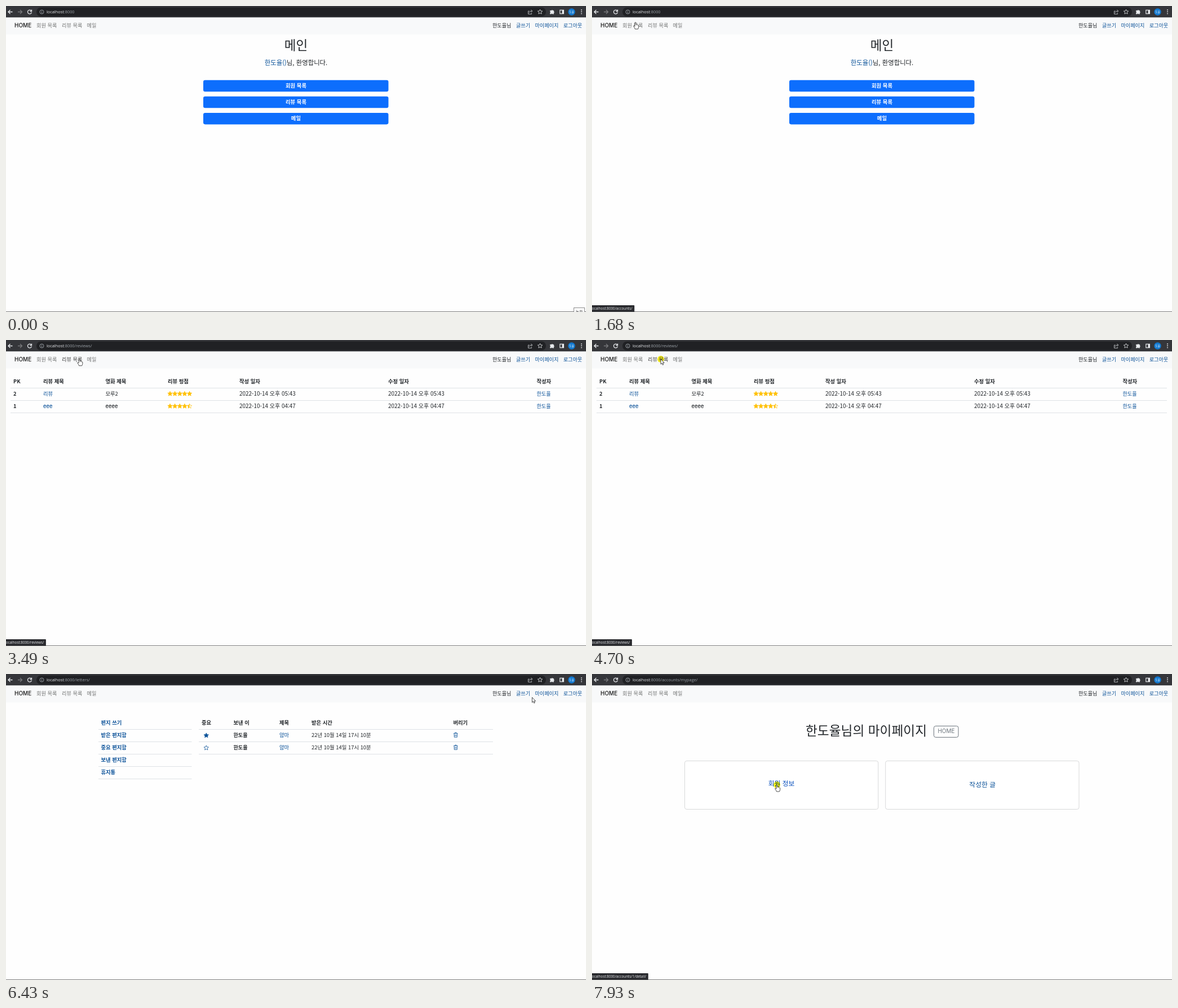
An HTML page that plays this animation: 1029 px wide and 544 px high, repeating every 8 s.

```html
<!DOCTYPE html>
<html lang="ko">
<head>
<meta charset="utf-8">
<style>
  html, body { margin: 0; width: 100%; height: 100%; overflow: hidden; background: #fefefe; }
  svg { display: block; }
  text { font-family: "Noto Sans CJK KR", "Noto Sans CJK", "Noto Sans", sans-serif; white-space: pre; }
  .latin { font-family: Inter, sans-serif; }
  .chrome { font-family: "Open Sans", sans-serif; }
  #glow { mix-blend-mode: multiply; }
</style>
</head>
<body>
<svg id="stage" width="1029" height="544" viewBox="0 0 1029 544"></svg>
<script>
const INK = '#212529', LINK = '#0b5299', MUTED = '#747575', LINE = '#dee2e6', BLUE = '#0d6efd';
const USER = '한도율';

// x, vertical centre, content, then options
function text(x, cy, content, { size = 9.3, fill = INK, weight = 500, anchor = 'start', cls = '', id = '' } = {}) {
  return `<text id="${id}" class="${cls}" x="${x}" y="${cy + size * 0.37}" font-size="${size}" fill="${fill}"
    font-weight="${weight}" text-anchor="${anchor}">${content}</text>`;
}
const rule = (x1, x2, y) => `<path d="M${x1} ${y}H${x2}" stroke="${LINE}"/>`;
const icon = (x, y, d, stroke, width = 1.2, fill = 'none') =>
  `<path transform="translate(${x} ${y})" d="${d}" stroke="${stroke}" stroke-width="${width}" fill="${fill}"/>`;
const heads = (cy, columns) => columns.map(([x, s]) => text(x, cy, s, { weight: 700 })).join('');

function starPath(r) {
  const points = Array.from({ length: 10 }, (_, i) => {
    const radius = i % 2 ? r * 0.47 : r, a = i * Math.PI / 5 - Math.PI / 2;
    return `${(radius * Math.cos(a)).toFixed(2)} ${(radius * Math.sin(a)).toFixed(2)}`;
  });
  return `M${points.join('L')}Z`;
}
const STAR = starPath(4.4);

function rating(cy, score) {
  let out = '';
  for (let i = 0; i < 5; i++) {
    const x = 291 + i * 8.65, full = i + 1 <= score;
    out += icon(x, cy, STAR, '#ffc107', 0.7, full ? '#ffc107' : 'none');
    if (!full) out += icon(x, cy, 'M0 -4.4L-1.2 -1.7L-4.2 -1.4L-2 .6L-2.6 3.6L0 2Z', 'none', 0, '#ffc107');
  }
  return out;
}

function toolbar() {
  const light = '#e8eaed', gray = '#9aa0a6';
  return `<rect width="1029" height="20.5" fill="#35363a"/>
    <rect x="54" y="2.5" width="904" height="16" rx="8" fill="#202124"/>`
    + icon(7.5, 10.5, 'M4 0H-3.3M0 -3.5L-3.5 0L0 3.5', light, 1.3)
    + icon(25, 10.5, 'M-4 0H3.3M0 -3.5L3.5 0L0 3.5', '#77787b', 1.3)
    + `<g id="reload">${icon(42, 10.5, 'M2.6 -2.3A3.5 3.5 0 1 0 3.4 .8M3.5 -4V-1H.5', light, 1.3)}</g>`
    + `<g id="stop">${icon(42, 10.5, 'M-3 -3L3 3M3 -3L-3 3', light, 1.3)}</g>`
    + `<circle cx="63.5" cy="10.5" r="3.5" fill="none" stroke="${gray}"/>`
    + icon(63.5, 10.5, 'M0 -2V-1M0 -.3V2', gray, 1)
    + `<text id="url" class="chrome" x="72" y="13.2" font-size="7.35" fill="#e8eaed">localhost<tspan
        fill="${gray}">:8000</tspan><tspan id="path" fill="${gray}"></tspan></text>`
    + icon(930, 11, 'M-1.5 -2H-3.5V3.3H2.5V1.5M-1.8 1C-1.5 -1 0 -2 3.6 -2M1.5 -4.2L3.8 -2L1.5 .2', '#c4c7ca', 0.9)
    + icon(947.5, 10.5, STAR, '#d5d7da', 0.9)
    + icon(969, 10.5, 'M-3.7 -2.5H-1.2A1.3 1.3 0 0 1 1.2 -2.5H2.8V-.6A1.3 1.3 0 0 1 2.8 1.8V3.8H.6A1.2 1.2 0 0 0 -1.6 3.8H-3.7V1.6A1.2 1.2 0 0 0 -3.7 -.6Z', light, 0.3, light)
    + `<rect x="982.8" y="7.3" width="6.6" height="6.4" fill="none" stroke="${light}" stroke-width="1.2"/>
       <rect x="986.5" y="7" width="3" height="7" fill="${light}"/>
       <circle cx="1003.5" cy="10.5" r="6.2" fill="#1279d1"/>`
    + text(1003.5, 10.4, USER.slice(1), { size: 4.6, fill: '#fff', anchor: 'middle' })
    + [7, 10.3, 13.6].map(y => `<circle cx="1021" cy="${y}" r=".95" fill="${light}"/>`).join('');
}

function navbar() {
  return `<rect y="20.5" width="1029" height="30" fill="#f8f9fa"/>`
    + text(15, 34.6, 'HOME', { size: 10, fill: '#181818', cls: 'latin' })
    + text(54, 34.4, '회원 목록', { size: 9.2, fill: MUTED })
    + text(99, 34.4, '리뷰 목록', { size: 9.2, fill: MUTED, id: 'navReviews' })
    + text(143.5, 34.4, '메일', { size: 9.2, fill: MUTED, id: 'navMail' })
    + text(863, 34.4, USER + '님', { size: 9.1 })
    + [[905, '글쓰기'], [938.5, '마이페이지'], [988.7, '로그아웃']]
      .map(([x, s]) => text(x, 34.4, s, { size: 9.1, fill: LINK })).join('');
}

function mainPage() {
  const buttons = ['회원 목록', '리뷰 목록', '메일'].map((label, i) => {
    const y = 131.7 + i * 29.1;
    return `<rect x="350" y="${y}" width="328.5" height="20.5" rx="3.3" fill="${BLUE}"/>`
      + text(514.5, y + 9.5, label, { size: 9.4, fill: '#fff', weight: 700, anchor: 'middle' });
  });
  return text(514.5, 70, '메인', { size: 22.5, anchor: 'middle' })
    + text(514.5, 100.6, `<tspan fill="${LINK}">${USER}()</tspan>님, 환영합니다.`, { size: 11.4, anchor: 'middle' })
    + buttons.join('');
}

function accountsPage() {
  return heads(73.3, [[13, 'PK'], [134, '이름'], [321, '이메일']])
    + rule(8, 1020, 85.5) + rule(8, 1020, 107.5)
    + text(12.5, 95.6, '1')
    + text(134, 95.6, USER, { size: 9.1, fill: LINK })
    + text(321, 95.6, 'norabit0417@mail.test', { size: 9.8, cls: 'latin', weight: 400 });
}

function reviewsPage() {
  const columns = [[13, 'PK'], [66, '리뷰 제목'], [176.5, '영화 제목'], [287, '리뷰 평점'],
    [414, '작성 일자'], [678, '수정 일자'], [941.5, '작성자']];
  const rows = [['2', '리뷰', '모루2', 5, '05:43'], ['1', 'eee', 'eeee', 4.5, '04:47']];
  return heads(73.3, columns) + rule(8, 1020, 85.5) + rows.map(([pk, title, film, score, time], i) => {
    const y = 95.6 + i * 22.1, cls = i ? 'latin' : '', date = `2022-10-14 오후 ${time}`;
    return text(13, y, pk, { weight: 700 })
      + text(66, y, title, { fill: LINK, cls }) + text(176.5, y, film, { cls })
      + rating(y, score)
      + text(414, y, date, { size: 9.95, weight: 400 }) + text(678, y, date, { size: 9.95, weight: 400 })
      + text(941.5, y, USER, { size: 9.1, fill: LINK }) + rule(8, 1020, 107.5 + i * 22);
  }).join('');
}

function lettersPage() {
  const boxes = ['편지 쓰기', '받은 편지함', '중요 편지함', '보낸 편지함', '휴지통'].map((label, i) =>
    text(168.5, 86.3 + i * 22.1, label, { fill: LINK, weight: 700 }) + rule(164, 329.5, 98.5 + i * 22));
  const rows = [0, 1].map(i => {
    const y = 108.4 + i * 22.1;
    return icon(355.3, y + 0.9, STAR, LINK, 0.8, i ? 'none' : LINK)
      + text(403.5, y, USER, { size: 9.1, weight: 700 })
      + text(485, y, '얌마', { fill: LINK })
      + text(542, y, '22년 10월 14일 17시 10분', { size: 9.4 })
      + icon(797.8, y, 'M-3.6 -2.9H3.6M-1.3 -3.2V-4.2H1.3V-3.2M-2.9 -2.8L-2.5 4H2.5L2.9 -2.8M-1 -1V2.5M1 -1V2.5', LINK, 0.8)
      + rule(342, 864, 120.5 + i * 22);
  });
  return boxes.join('') + rule(342, 864, 98.5) + rows.join('')
    + heads(86.3, [[347, '중요'], [403.5, '보낸 이'], [485, '제목'], [542, '받은 시간'], [793.5, '버리기']]);
}

function myPage() {
  const card = x => `<rect x="${x}" y="154.5" width="343.3" height="86" rx="3.5" fill="#fff" stroke="#d8d9da"/>`;
  return text(379, 100.5, USER + '님의 마이페이지', { size: 22.7 })
    + `<rect x="606.5" y="92.5" width="43.5" height="20" rx="3.3" fill="none" stroke="#6c757d"/>`
    + text(628.5, 101.6, 'HOME', { size: 10, fill: '#6c757d', weight: 400, cls: 'latin', anchor: 'middle' })
    + card(164.5) + card(520.7)
    + text(336, 194.2, '회원 정보', { size: 11.8, fill: LINK, anchor: 'middle', id: 'detailLink' })
    + text(692.7, 196.2, '작성한 글', { size: 11.8, fill: LINK, anchor: 'middle' });
}

const pages = { main: mainPage, accounts: accountsPage, reviews: reviewsPage, letters: lettersPage, mypage: myPage };
const stage = document.getElementById('stage');
stage.innerHTML = '<rect width="1029" height="544" fill="#fefefe"/>' + toolbar() + navbar()
  + Object.entries(pages).map(([name, draw]) => `<g id="${name}">${draw()}</g>`).join('')
  + '<path d="M0 543.5H1029" stroke="#7b7b7b"/>'
  + `<g id="tooltip"><rect x="1007.5" y="536.5" width="19" height="10" fill="#fff" stroke="#8a8a8a"/>
     ${text(1017, 543.5, '녹화', { size: 7, fill: '#555', weight: 400, anchor: 'middle' })}</g>`
  + `<g id="status"><path id="statusBox" fill="#292a2e"/>
     <text id="statusText" class="chrome" x="-.2" y="540.2" font-size="6.3" fill="#e8eaed"></text></g>`
  + '<circle id="glow" r="6" fill="#f7ee24"/>'
  + `<g id="arrow">${icon(0, 0, 'M0 0V9L2 7.2L3.4 10.3L4.9 9.6L3.5 6.6H6.2Z', '#222', 0.8, '#fff')}</g>`
  + `<g id="hand">${icon(0, 0, 'M-1 .6Q0 -.8 1 .6V4.2Q2 3.5 2.7 4.5Q3.7 4 4.3 5Q5.7 4.7 5.7 6.2V8.5Q5.5 10 4.5 12H-.6Q-1 10 -2.5 8.4Q-4.2 6.4 -2.8 6.2Q-2 6.2 -1 7.3Z', '#222', 0.8, '#fff')}</g>`;

const el = id => document.getElementById(id);
const show = (id, on) => { el(id).style.display = on ? '' : 'none'; };
const within = (t, spans) => spans.some(([from, to]) => t >= from && t < to);
const latest = (t, list) => list.filter(([start]) => start <= t).pop();

const VISITS = [[0, 'main', ''], [2000, 'accounts', '/accounts/'], [3130, 'reviews', '/reviews/'],
  [5300, 'letters', '/letters/'], [6800, 'mypage', '/accounts/mypage/']];
const HOVERS = [[0, ''], [1200, 'accounts/'], [2350, 'reviews/'], [3500, 'letters/'], [4300, 'reviews/'],
  [5050, 'letters/'], [5760, ''], [6650, 'accounts/mypage/'], [7200, ''], [7810, 'accounts/1/detail/']];
const LOADING = [[1750, 2000], [2450, 3130], [4780, 4930], [5180, 5300], [6700, 6800]];
const CLICKS = [[1510, 1650], [2410, 2540], [4640, 4770], [5110, 5230], [6650, 6760], [7870, 8000]];
const HAND = [[1200, 3130], [3250, 4620], [4900, 5340], [6650, 6760], [7800, 8000]];
const ROUTE = [[30, 1017, 532], [300, 820, 320], [600, 430, 105], [830, 232, 30], [880, 228, 29],
  [1100, 115, 24], [1290, 77, 29], [1700, 77, 29], [2290, 125, 33], [2580, 142, 38], [2750, 148, 37],
  [3000, 122, 34], [3430, 122, 34], [3640, 150, 33], [4150, 150, 33], [4450, 122, 34], [4950, 122, 34],
  [5100, 149, 33], [5300, 151, 33], [5500, 330, 36], [5690, 600, 32], [5800, 662, 34], [6100, 830, 68],
  [6500, 955, 36], [6700, 955, 34], [6860, 862, 63], [7150, 690, 110], [7440, 490, 126], [7640, 320, 193],
  [7800, 328, 197], [8000, 328, 197]];

function pointer(t) {
  const i = Math.max(1, ROUTE.findIndex(([time]) => time > t));
  const [t0, x0, y0] = ROUTE[i - 1], [t1, x1, y1] = ROUTE[i];
  const k = Math.max(0, (t - t0) / (t1 - t0));
  return [x0 + (x1 - x0) * k, y0 + (y1 - y0) * k];
}

let shownHover = null;
function setStatus(label) {
  if (label === shownHover) return;
  shownHover = label;
  show('status', label);
  el('statusText').textContent = 'ocalhost:8000/' + label;
  const right = label ? el('statusText').getComputedTextLength() + 3.5 : 0;
  el('statusBox').setAttribute('d', `M0 532H${right - 1}Q${right} 532 ${right} 533V543.5H0Z`);
}

function render(t) {
  const [, page, path] = latest(t, VISITS);
  Object.keys(pages).forEach(name => show(name, name === page));
  el('path').textContent = path;

  const loading = within(t, LOADING);
  show('stop', loading);
  show('reload', !loading);

  const hover = latest(t, HOVERS)[1];
  setStatus(hover);
  const fade = page === 'letters' ? (t - 5560) / 200 : page === 'mypage' && t < 7300 ? (t - 7000) / 200 : 0;
  el('status').style.opacity = 1 - Math.min(1, Math.max(0, fade));
  el('navReviews').setAttribute('fill', hover === 'reviews/' ? '#404040' : MUTED);
  el('navMail').setAttribute('fill', hover === 'letters/' && t < 5400 ? '#404040' : MUTED);
  el('detailLink').setAttribute('fill', t > 7800 ? '#0a50bd' : LINK);

  show('tooltip', t < 200);
  const [x, y] = pointer(t), hand = within(t, HAND);
  show('hand', hand);
  show('arrow', !hand && t >= 30);
  show('glow', within(t, CLICKS));
  ['hand', 'arrow', 'glow'].forEach(id => el(id).setAttribute('transform', `translate(${x} ${y})`));
}

const start = performance.now();
function tick() {
  render((performance.now() - start) % 8000);
  requestAnimationFrame(tick);
}
tick();
</script>
</body>
</html>
```
